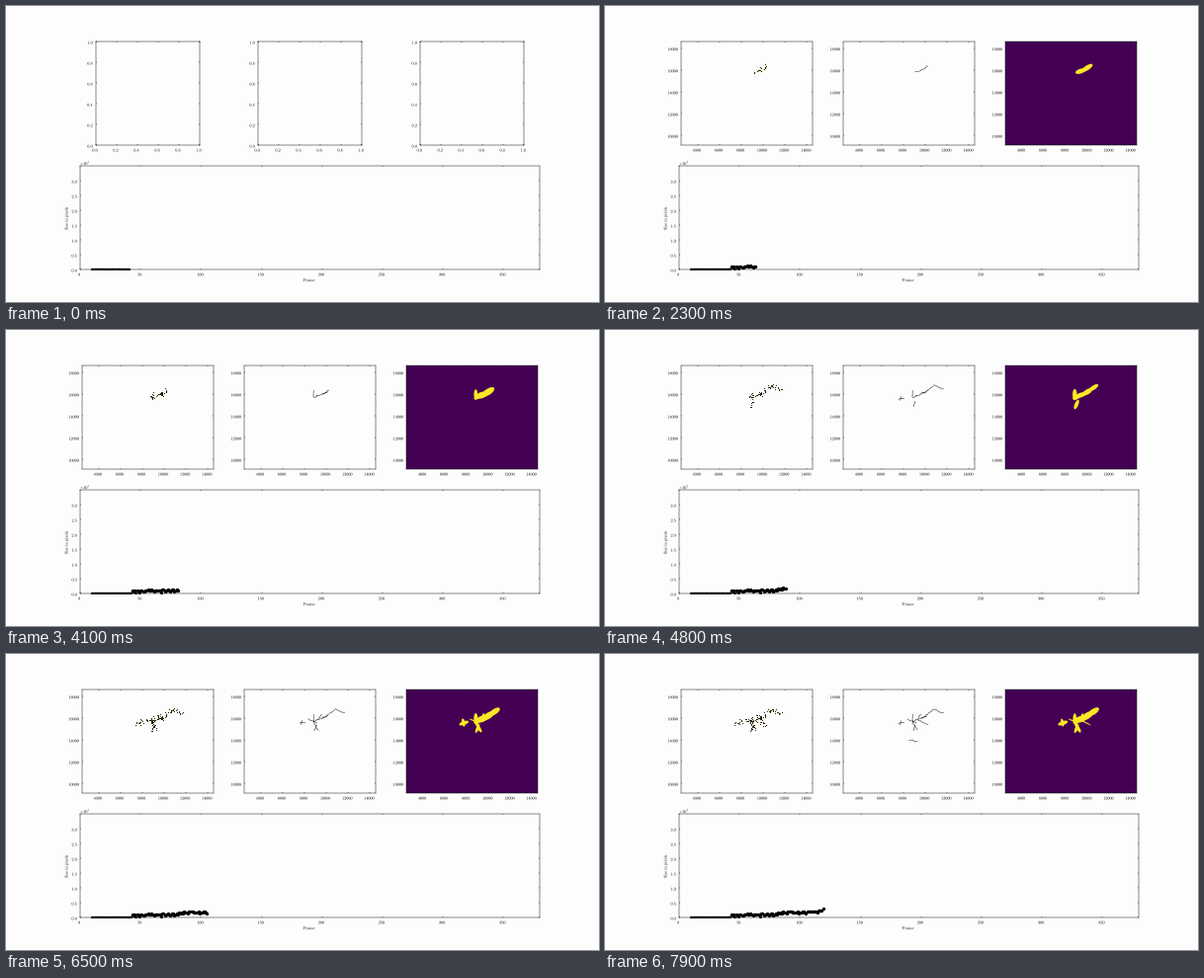
A matplotlib script that plays this animation: 600x300 px, repeating every 8000 ms.

```python
import numpy as np
import matplotlib.pyplot as plt
from matplotlib.animation import FuncAnimation
from matplotlib.collections import LineCollection, PolyCollection
from matplotlib.patheffects import Normal

plt.rcParams.update({
    "mathtext.fontset": "cm", "font.size": 10, "axes.linewidth": 1.1,
    "xtick.direction": "in", "ytick.direction": "in",
    "xtick.top": True, "ytick.right": True,
    "xtick.major.width": 1.1, "ytick.major.width": 1.1,
})

STEPS, FIRST = 80, 40
PAPER, PURPLE, YELLOW = "#fdfdfd", "#440154", "#fde725"
X0, Y1, UNIT = 2500, 18600, 9500 / 105
SOFT = dict(path_effects=[Normal()])  # text as outlines, free of hinting

# Branches in panel pixels: step the line appears, step its body appears,
# body thickness, key points
BRANCHES = [
    (1, 1, 5.5, [(73, 31), (79, 29), (86, 24.5)]),
    (29, 29, 4, [(70, 26), (70, 33), (74, 31)]),
    (29, 29, 3, [(79, 29), (85, 27)]),
    (43, 43, 5, [(86, 24.5), (92, 20.5)]),
    (43, 43, 0, [(92, 20.5), (96, 22), (102, 23.5)]),
    (43, 43, 3.5, [(73, 36.5), (70.5, 42.5)]),
    (43, 64, 3.5, [(55, 35), (61, 33)]),
    (43, 64, 3, [(57, 31), (58, 36)]),
    (57, 57, 1.5, [(64, 30), (74, 34)]),
    (57, 57, 3, [(70, 32), (72, 37), (75, 42)]),
    (57, 57, 2, [(76, 30), (78, 25)]),
    (75, 75, 1.3, [(76, 31), (86, 36)]),
    (75, STEPS, 0, [(67, 52), (70, 51), (75, 53)]),
]


def to_data(uv):
    uv = np.asarray(uv, float)
    return np.column_stack([X0 + UNIT * uv[:, 0], Y1 - UNIT * uv[:, 1]])


def bend(points, rng):
    """Resample a branch about every 2 px and make it a little crooked."""
    p = np.array(points, float)
    run = np.r_[0, np.cumsum(np.hypot(*np.diff(p, axis=0).T))]
    t = np.linspace(0, run[-1], max(3, int(run[-1] / 2)))
    line = np.column_stack([np.interp(t, run, p[:, i]) for i in (0, 1)])
    return line + rng.normal(0, 0.5, line.shape)


def scatter_along(line, rng):
    count = int(2.6 * len(line))
    t = rng.uniform(0, len(line) - 1, count)
    pts = np.column_stack([np.interp(t, np.arange(len(line)), c) for c in line.T])
    return pts + rng.normal(0, 1, pts.shape)


def blob(a, b, thick):
    """Ellipse laid over the segment from a to b."""
    a, b = np.array(a, float), np.array(b, float)
    length = np.hypot(*(b - a))
    along = (b - a) / length
    across = np.array([-along[1], along[0]])
    t = np.linspace(0, 2 * np.pi, 28)[:, None]
    reach = length / 2 + 0.5 * thick
    return to_data((a + b) / 2 + reach * np.cos(t) * along
                   + thick / 2 * np.sin(t) * across)


seeds = np.random.default_rng(5)
lines = [bend(points, seeds) for *_, points in BRANCHES]
clouds = [scatter_along(line, seeds) for line in lines]

# Size curve
n = np.arange(10, FIRST + STEPS)
rise = 0.075 + 0.0012 * (n - 43) + 0.035 * (n >= 83) + 0.03 * (n >= 115)
rise += np.random.default_rng(3).normal(0, 0.022, n.size)
size = np.where(n < 43, 0.01, rise)

fig = plt.figure(figsize=(20, 10), dpi=30, facecolor=PAPER)
grid = fig.add_gridspec(2, 3)
panels = [fig.add_subplot(grid[0, i]) for i in range(3)]
growth = fig.add_subplot(grid[1, :])


def label(axis, ticks, fmt):
    axis.set_ticks(ticks, [f"${t:{fmt}}$" for t in ticks], **SOFT)


growth.set(xlim=(0, 380), ylim=(0, 3.5), facecolor=PAPER)
growth.set_xlabel(r"$\mathrm{Frame}$", **SOFT)
growth.set_ylabel(r"$\mathrm{Size\ in\ pixels}$", **SOFT)
growth.xaxis.set_label_coords(0.5, -0.068)
growth.yaxis.set_label_coords(-0.0205, 0.5)
label(growth.xaxis, range(0, 351, 50), "d")
label(growth.yaxis, np.arange(0, 3.1, 0.5), ".1f")
growth.text(0, 1.01, r"$\times 10^7$", transform=growth.transAxes, **SOFT)
curve, = growth.plot([], [], "o-", color="black", ms=7, lw=1.5)

for ax in panels:
    ax.set_aspect("equal")
halo = panels[0].scatter([], [], color=YELLOW, linewidths=0)
dots = panels[0].scatter([], [], s=6, color="black", linewidths=0)
bones = panels[1].add_collection(LineCollection([], colors="black", linewidths=1.1))
mask = panels[2].add_collection(PolyCollection([], facecolors=YELLOW, edgecolors="none"))


def set_view(empty):
    for ax in panels:
        if empty:
            ax.set(xlim=(0, 1), ylim=(0, 1))
            for axis in (ax.xaxis, ax.yaxis):
                label(axis, np.arange(0, 1.1, 0.2), ".1f")
        else:
            ax.set(xlim=(X0, X0 + 12000), ylim=(Y1 - 9500, Y1))
            label(ax.xaxis, range(4000, 14001, 2000), "d")
            label(ax.yaxis, range(10000, 18001, 2000), "d")
        ax.set_facecolor(PAPER)
    if not empty:
        panels[2].set_facecolor(PURPLE)
    for art in (halo, dots, bones, mask):
        art.set_visible(not empty)


def update(k):
    shown = n <= FIRST + k
    curve.set_data(n[shown], size[shown])
    if k < 2:
        set_view(k == 0)
    if k == 0:
        return
    rng = np.random.default_rng(100 + k)
    pts, segs, bodies = [], [], []
    for i, (drawn, filled, thick, points) in enumerate(BRANCHES):
        if k >= drawn:
            segs.append(to_data(lines[i] + rng.normal(0, 0.2, lines[i].shape)))
        if k >= filled:
            pts.append(clouds[i] + rng.normal(0, 0.2, clouds[i].shape))
            swell = thick * (1 + 0.15 * np.sin(0.5 * k + 2 * i))
            if thick:
                bodies += [blob(a, b, swell) for a, b in zip(points, points[1:])]
    spots = to_data(np.vstack(pts))
    dots.set_offsets(spots)
    halo.set_offsets(spots)
    halo.set_sizes([7 + 30 * np.exp(-k / 10)])
    bones.set_segments(segs)
    mask.set_verts(bodies)


anim = FuncAnimation(fig, update, frames=STEPS, interval=100,
                     init_func=lambda: update(0), repeat=True, repeat_delay=0)
plt.show()
```
